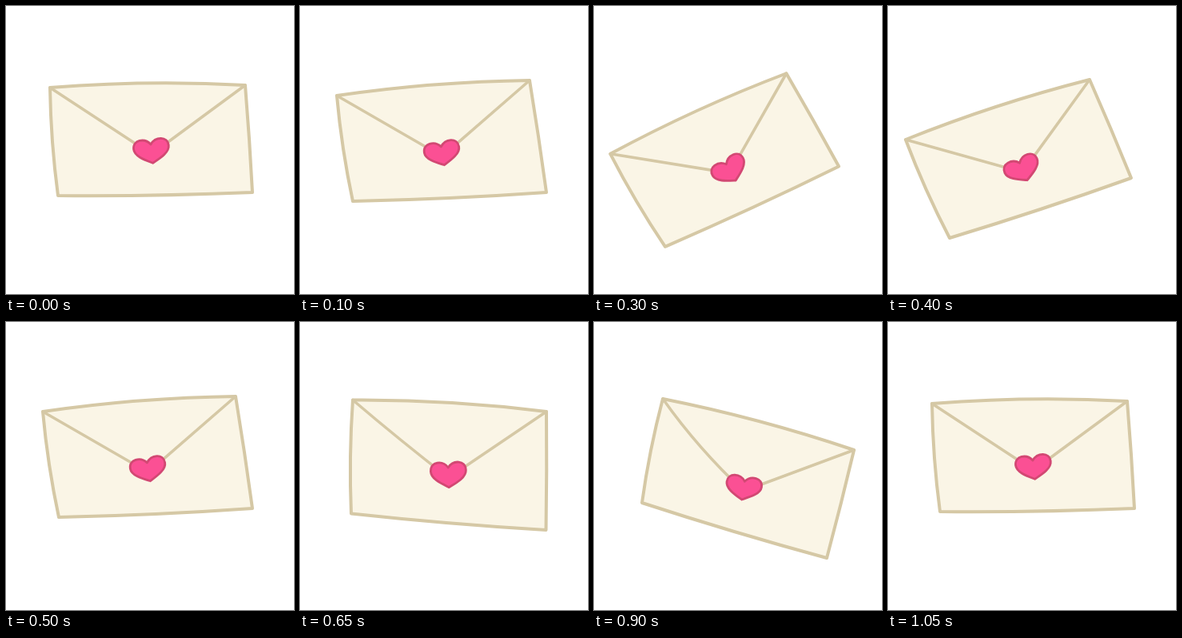
Animation of 360x360 px, one loop 1.1 s. Source, as an HTML page with a canvas:

```html
<!DOCTYPE html>
<html lang="en">
<head>
<meta charset="utf-8">
<title>Love letter</title>
<style>
  html, body { margin: 0; overflow: hidden; background: #fff; }
  canvas { display: block; }
</style>
</head>
<body>
<canvas id="stage" width="360" height="360"></canvas>
<script>
const ctx = document.getElementById('stage').getContext('2d');
const STEP = 50, COUNT = 22;
const LINE = '#d5c8a5', PAPER = '#faf5e6', PINK = '#fb5094', ROSE = '#d24873';
const BOWS = [4, 0.5, 1.5, 2]; // outward bend of the top, right, bottom and left edge

// envelope corners, clockwise from top left
const rest = [[55, 102], [299, 99], [308, 233], [65, 237]];
const nudge = [[46, 112], [287, 93], [308, 233], [66, 244]];
const left = [[22, 167], [252, 92], [304, 215], [77, 290]];
const right = [[77, 93], [317, 125], [307, 287], [63, 242]];
const farRight = [[86, 96], [325, 160], [291, 295], [60, 226]];

const turn = (pose, degrees, [px, py]) => {
  const c = Math.cos(degrees * Math.PI / 180), s = Math.sin(degrees * Math.PI / 180);
  return pose.map(([x, y]) =>
    [px + (x - px) * c - (y - py) * s, py + (x - px) * s + (y - py) * c]);
};

// pose reached at each key step
const keys = [
  [0, rest], [2, nudge], [4, left], [6, turn(left, -6.5, [178, 190])],
  [8, left], [10, nudge], [11, rest], [15, right], [16, farRight],
  [17, turn(farRight, 5, [188, 246])], [18, farRight], [19, right], [21, rest]
];

function poseAt(step) {
  const n = keys.findIndex(([s]) => s >= step);
  const [end, to] = keys[n], [begin, from] = keys[Math.max(n - 1, 0)];
  const k = n ? (step - begin) / (end - begin) : 0;
  return from.map((p, i) => p.map((v, j) => v + (to[i][j] - v) * k));
}

function bowTo([ax, ay], [bx, by], bow) {
  const dx = bx - ax, dy = by - ay, s = 2 * bow / Math.hypot(dx, dy);
  ctx.quadraticCurveTo((ax + bx) / 2 + dy * s, (ay + by) / 2 - dx * s, bx, by);
}

function stroke(color, width) {
  ctx.strokeStyle = color;
  ctx.lineWidth = width;
  ctx.stroke();
}

function heart(x, y, w, h, angle) {
  ctx.save();
  ctx.translate(x, y);
  ctx.rotate(angle);
  ctx.beginPath();
  for (const side of [-w, w]) {
    ctx.moveTo(0, -0.55 * h);
    ctx.bezierCurveTo(0.3 * side, -1.15 * h, side, -1.1 * h, side, -0.3 * h);
    ctx.bezierCurveTo(side, 0.3 * h, 0.4 * side, 0.7 * h, 0, h);
  }
  ctx.fillStyle = PINK;
  ctx.fill();
  stroke(ROSE, 2.8);
  ctx.restore();
}

function draw(step) {
  const corners = poseAt(step), [tl, tr, , bl] = corners;
  const angle = Math.atan2(tr[1] - tl[1], tr[0] - tl[0]);
  const height = Math.hypot(bl[0] - tl[0], bl[1] - tl[1]);
  const [midX, midY] = [0, 1].map(j => corners.reduce((sum, p) => sum + p[j] / 4, 0));
  const x = midX - 13.5 * Math.sin(angle), y = midY + 13.5 * Math.cos(angle);

  ctx.clearRect(0, 0, 360, 360);
  ctx.lineJoin = ctx.lineCap = 'round';

  ctx.beginPath();
  ctx.moveTo(...tl);
  corners.forEach((c, i) => bowTo(c, corners[(i + 1) % 4], BOWS[i]));
  ctx.closePath();
  ctx.fillStyle = PAPER;
  ctx.fill();
  stroke(LINE, 4);

  // both folds meet behind the heart
  ctx.beginPath();
  ctx.moveTo(...tl);
  bowTo(tl, [x, y + 4], -Math.max(0, angle * 15));
  ctx.lineTo(...tr);
  stroke(LINE, 3.6);

  heart(x, y, 22, height * 0.112, angle - 0.1);
}

const start = performance.now();
function tick() {
  draw(Math.floor((performance.now() - start) / STEP) % COUNT);
  requestAnimationFrame(tick);
}
tick();
</script>
</body>
</html>
```
